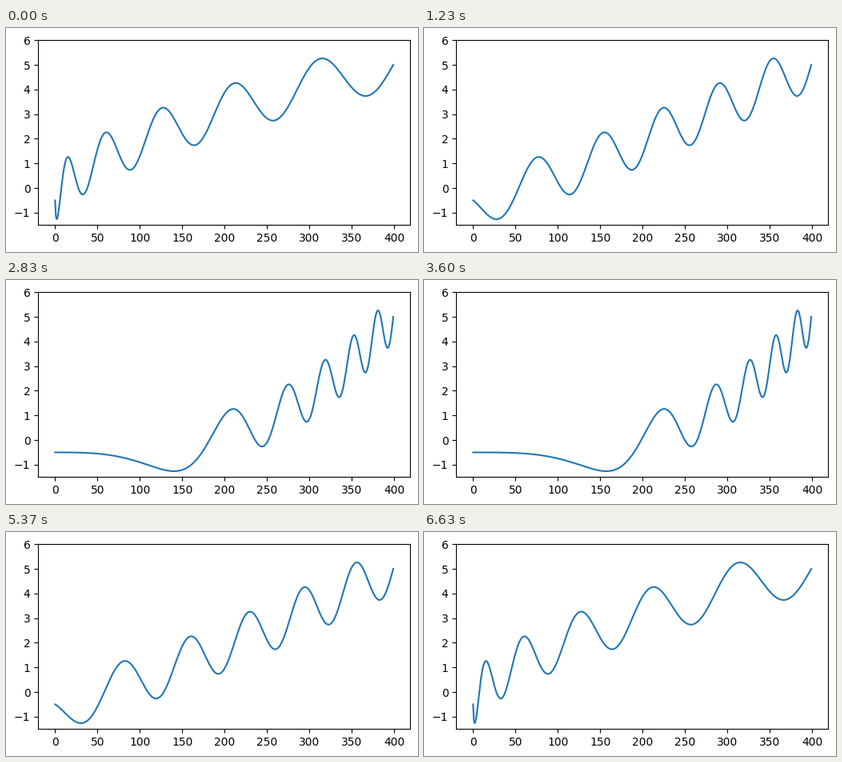
A matplotlib script that plays this animation: 515x280 px, repeating every 6.66 s.

```python
import numpy as np
import matplotlib.pyplot as plt
from matplotlib.animation import FuncAnimation

W, H, DPI = 515, 280, 100
HALF = 100                 # frames in each direction
LOOP_MS = 6660
LOW, HIGH = -0.5, 5.0

u = np.linspace(0, 1, 400)
powers = np.geomspace(0.6, 4, HALF)


def wave(power):
    """Rising sine whose parameter is warped by a power law."""
    z = LOW + (HIGH - LOW) * u ** power
    return z + np.sin(2 * np.pi * z)


fig = plt.figure(figsize=(W / DPI, H / DPI), dpi=DPI)
ax = fig.add_axes([40.22 / W, 33.72 / H, 465 / W, 231 / H])
line, = ax.plot(wave(powers[0]), color="C0", lw=1.5)
ax.set_ylim(-1.5, 6)
ax.set_yticks(range(-1, 7))


def update(i):
    # there and back, holding each end for two frames
    step = i if i < HALF else 2 * HALF - 1 - i
    line.set_ydata(wave(powers[step]))
    return line,


anim = FuncAnimation(fig, update, frames=2 * HALF,
                     interval=LOOP_MS / (2 * HALF), repeat=True,
                     repeat_delay=0)
plt.show()
```
